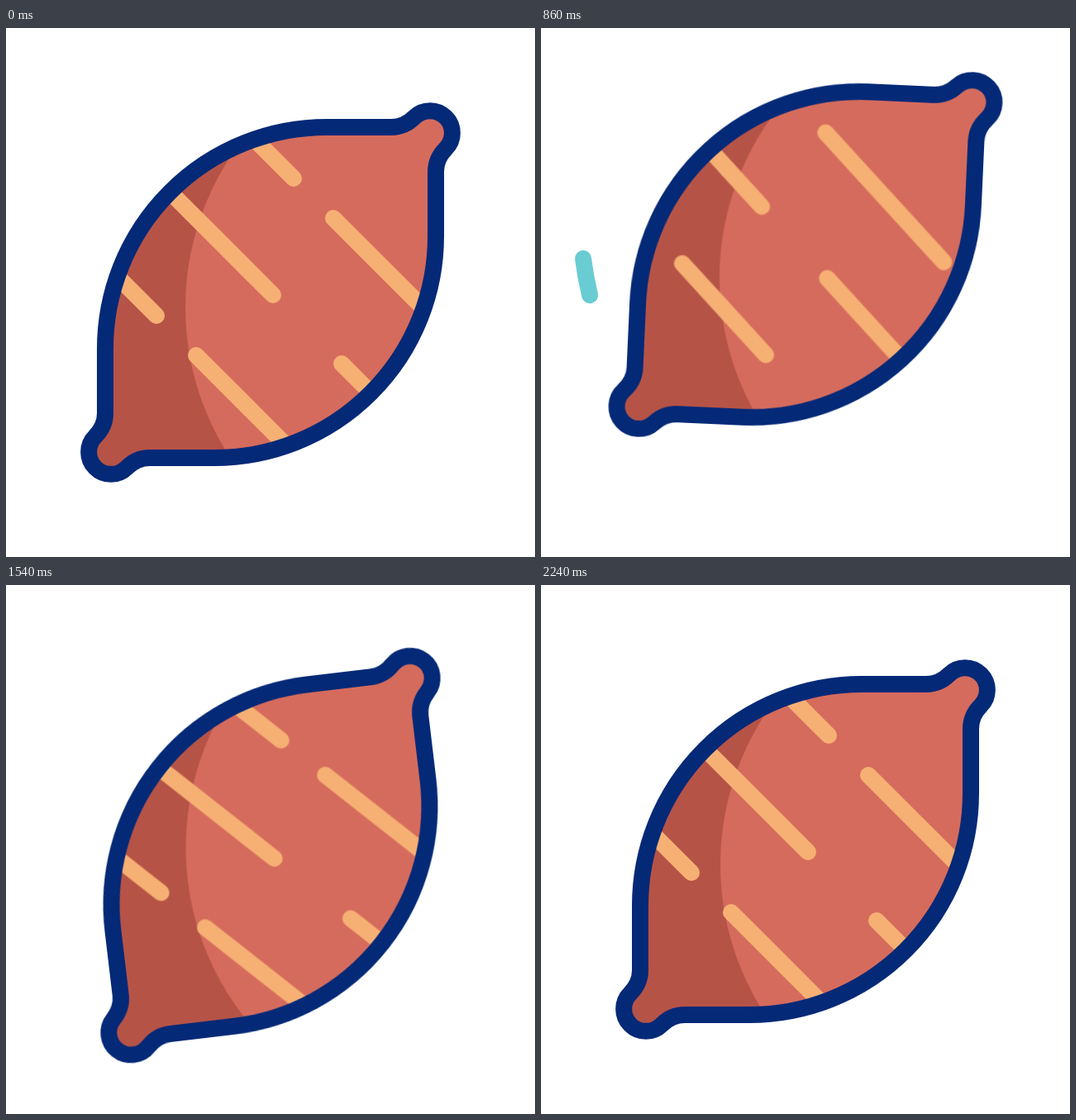
Animation, 640 px wide and 640 px high, one loop 2.44 s. Source, as an HTML page:

```html
<!DOCTYPE html>
<html lang="en">
<head>
<meta charset="utf-8">
<title>Sweet potato</title>
<style>
  html, body { margin: 0; width: 100%; height: 100%; overflow: hidden; background: #fff; }
  svg { display: block; width: 100vw; height: 100vh; }

  .hop, .tilt, .stripes, .swish { animation: 2440ms infinite; }
  .hop { animation-name: hop; }
  .tilt { animation-name: tilt; transform-origin: 320px 320px; }
  .stripes { animation-name: roll; }
  .outer { animation-name: outer; }
  .inner { animation-name: inner; }

  .stripes, .swish { fill: none; stroke-width: 20; stroke-linecap: round; }
  .stripes { stroke: #f6b074; }
  .swish { stroke: #68ccd2; }

  @keyframes hop {
    0%       { transform: translateY(0); animation-timing-function: cubic-bezier(.47, 0, .73, 1); }
    18.238%  { transform: translateY(60px); animation-timing-function: cubic-bezier(.37, 0, .51, 1); }
    35.246%  { transform: translateY(-46px); animation-timing-function: cubic-bezier(.46, 0, .65, 1); }
    53.279%  { transform: translateY(62px); animation-timing-function: cubic-bezier(.37, 0, .63, 1); }
    69.057%  { transform: translateY(-17px); animation-timing-function: cubic-bezier(.37, 0, .63, 1); }
    90.164%, 100% { transform: translateY(0); }
  }
  @keyframes roll {
    0%       { transform: translate(0, 0); animation-timing-function: cubic-bezier(.47, 0, .73, 1); }
    18.238%  { transform: translate(49px, 49px); animation-timing-function: cubic-bezier(.37, 0, .51, 1); }
    35.246%  { transform: translate(-58.5px, -58.5px); animation-timing-function: cubic-bezier(.46, 0, .65, 1); }
    53.279%  { transform: translate(54px, 54px); animation-timing-function: cubic-bezier(.37, 0, .63, 1); }
    69.057%  { transform: translate(-22px, -22px); animation-timing-function: cubic-bezier(.37, 0, .63, 1); }
    90.164%, 100% { transform: translate(0, 0); }
  }
  @keyframes tilt {
    0%       { transform: rotate(0deg); animation-timing-function: cubic-bezier(.3, 0, .52, 1); }
    26.434%  { transform: rotate(-10deg); animation-timing-function: cubic-bezier(.4, 0, .63, 1); }
    41.393%  { transform: rotate(10deg); animation-timing-function: cubic-bezier(.37, 0, .63, 1); }
    59.426%  { transform: rotate(-10deg); animation-timing-function: cubic-bezier(.37, 0, .63, 1); }
    73.566%  { transform: rotate(10deg); animation-timing-function: cubic-bezier(.37, 0, .63, 1); }
    90.164%, 100% { transform: rotate(0deg); }
  }
  @keyframes inner {
    0%, 23.76%  { opacity: 0; stroke-dasharray: 0 300; stroke-dashoffset: 0; }
    23.77%   { opacity: 1; stroke-dasharray: 0 300; stroke-dashoffset: 0; animation-timing-function: linear; }
    27.869%  { opacity: 1; stroke-dasharray: 67 300; stroke-dashoffset: 0; animation-timing-function: linear; }
    30.328%  { opacity: 1; stroke-dasharray: 78 300; stroke-dashoffset: -22; animation-timing-function: ease-out; }
    34.426%  { opacity: 1; stroke-dasharray: 0 300; stroke-dashoffset: -100; }
    34.43%, 100% { opacity: 0; stroke-dasharray: 0 300; stroke-dashoffset: -100; }
  }
  @keyframes outer {
    0%, 25.4%  { opacity: 0; stroke-dasharray: 0 300; stroke-dashoffset: 0; }
    25.41%   { opacity: 1; stroke-dasharray: 0 300; stroke-dashoffset: 0; animation-timing-function: ease-in; }
    29.508%  { opacity: 1; stroke-dasharray: 45 300; stroke-dashoffset: 0; animation-timing-function: linear; }
    32.787%  { opacity: 1; stroke-dasharray: 62 300; stroke-dashoffset: -38; animation-timing-function: ease-out; }
    36.885%  { opacity: 1; stroke-dasharray: 0 300; stroke-dashoffset: -100; }
    36.89%, 100% { opacity: 0; stroke-dasharray: 0 300; stroke-dashoffset: -100; }
  }
</style>
</head>
<body>
<svg viewBox="0 0 640 640">
  <defs>
    <path id="skin" d="M388 120H466C476 120 486 116 494 108A26.8 26.8 0 0 1 532 146C524 154 520 164 520 174V252A268 268 0 0 1 252 520H174C164 520 154 524 146 532A26.8 26.8 0 0 1 108 494C116 486 120 476 120 466V388A268 268 0 0 1 388 120Z"/>
    <clipPath id="inside"><use href="#skin"/></clipPath>
  </defs>
  <g class="hop">
    <g class="tilt">
      <g clip-path="url(#inside)">
        <use href="#skin" fill="#b65347"/>
        <circle cx="549" cy="338" r="332" fill="#d56b5d"/>
        <path class="stripes" d="M238 72l110 110M396 230l150 150M199 199l124 124M406 406l90 90M72 238l110 110M230 396l106 106"/>
      </g>
      <use href="#skin" fill="none" stroke="#042977" stroke-width="20" stroke-linejoin="round"/>
    </g>
  </g>
  <path class="swish inner" pathLength="100" d="M387 550A298 298 0 0 1 138 297"/>
  <path class="swish outer" pathLength="100" d="M239 564A384 384 0 0 1 51 279"/>
</svg>
</body>
</html>
```
